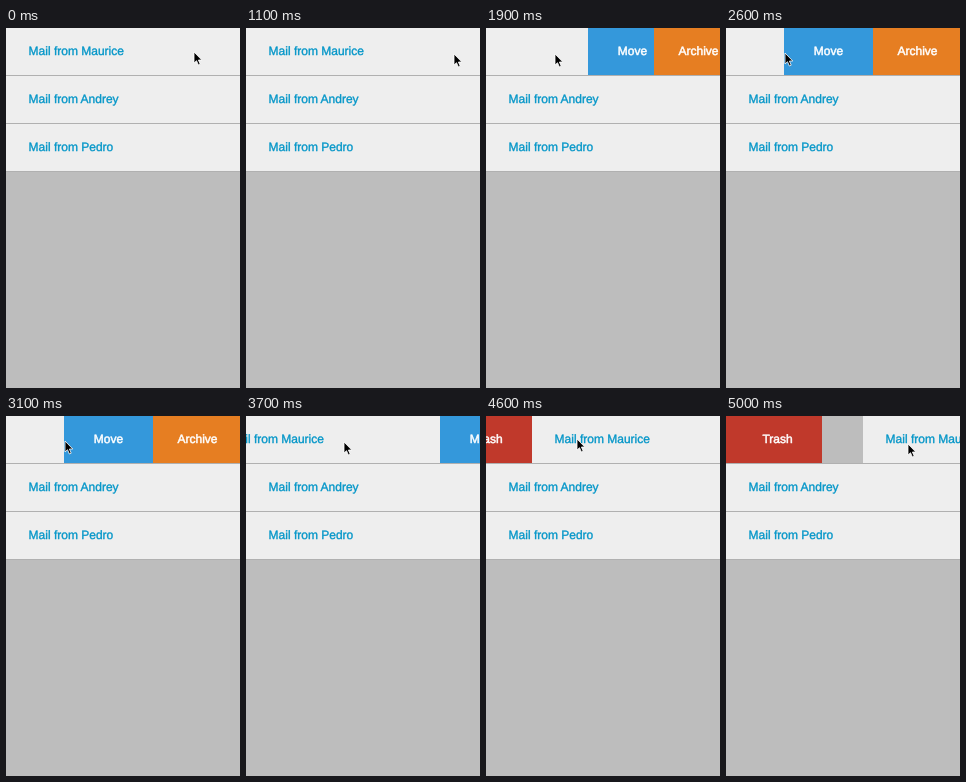
These frames come from a looping animation (234 by 360 pixels, 5.1 s). An HTML page:

```html
<!DOCTYPE html>
<html lang="en">
<head>
<meta charset="utf-8">
<style>
html, body { margin: 0; width: 100%; height: 100%; overflow: hidden; background: #bdbdbd; }
body { position: relative; font: 12px/46px "Liberation Sans", Arial, sans-serif; text-rendering: geometricPrecision; }
.row { position: relative; height: 47px; border-bottom: 1px solid #b0b0b0; overflow: hidden; }
.mail, .action { position: absolute; top: 0; left: 0; height: 47px; white-space: nowrap; }
.mail { width: 100%; padding-left: 22.6px; box-sizing: border-box; background: #eee;
  color: #0496c8; -webkit-text-stroke: .35px #0496c8; }
.action { width: 89px; text-align: center; color: #fff; -webkit-text-stroke: .5px #fff; }
#move { background: #3498db; }
#archive { background: #e67e22; }
#trash { background: #c0392b; box-shadow: -89px 0 #c0392b; }
#cursor { position: absolute; top: 0; left: 0; overflow: visible; }
</style>
</head>
<body>
<div class="row">
  <div class="mail" id="mail">Mail from Maurice</div>
  <div class="action" id="move">Move</div>
  <div class="action" id="archive">Archive</div>
  <div class="action" id="trash">Trash</div>
</div>
<div class="row"><div class="mail">Mail from Andrey</div></div>
<div class="row"><div class="mail">Mail from Pedro</div></div>
<svg id="cursor" width="10" height="16">
  <path d="M0 0V11L2.5 8.7 4.4 13 6.2 12.2 4.4 8H7.8Z" fill="#000" stroke="#fff" stroke-width=".8"/>
</svg>
<script>
const LOOP = 5100, STEP = 100, STAGE = 234, BUTTON = 89;

function place(id, x, y = 0) {
  document.getElementById(id).style.transform = `translate(${Math.round(x)}px, ${Math.round(y)}px)`;
}

// Smooth progress from 0 to 1 between two times
function ease(t, start, end) {
  const u = Math.min(1, Math.max(0, (t - start) / (end - start)));
  return u * u * (3 - 2 * u);
}

function draw(now) {
  const t = Math.floor(now % LOOP / STEP) * STEP;
  const wander = ease(t, 0, 1100);
  const dragLeft = ease(t, 1300, 2050);
  const snapOpen = ease(t, 2050, 2500);
  const close = ease(t, 3300, 3880);
  const goBack = ease(t, 3700, 4300);
  const dragRight = ease(t, 4300, 5090);

  const swipe = 142 * dragRight - 147 * dragLeft - 29 * snapOpen + 176 * close;
  const open = Math.max(0, -swipe);
  // Archive appears once Move is fully out, then shares the width with it
  const archive = Math.max(0, Math.min(87, open / 2, 1.5 * (open - 88)));
  // Trash resists being pulled past its own width
  const trash = Math.max(0, Math.min(swipe, 88 + (swipe - 88) * .16));

  place("mail", swipe);
  place("move", STAGE - open);
  place("archive", STAGE - archive);
  place("trash", trash - BUTTON);
  place("cursor",
    188 + 20 * wander - 155 * dragLeft + 6 * snapOpen + 39 * ease(t, 3100, 3700) - 53 * goBack + 142 * dragRight,
    24 + 2 * wander - snapOpen + close - 6 * goBack + 8 * dragRight);
  requestAnimationFrame(draw);
}
requestAnimationFrame(draw);
</script>
</body>
</html>
```
